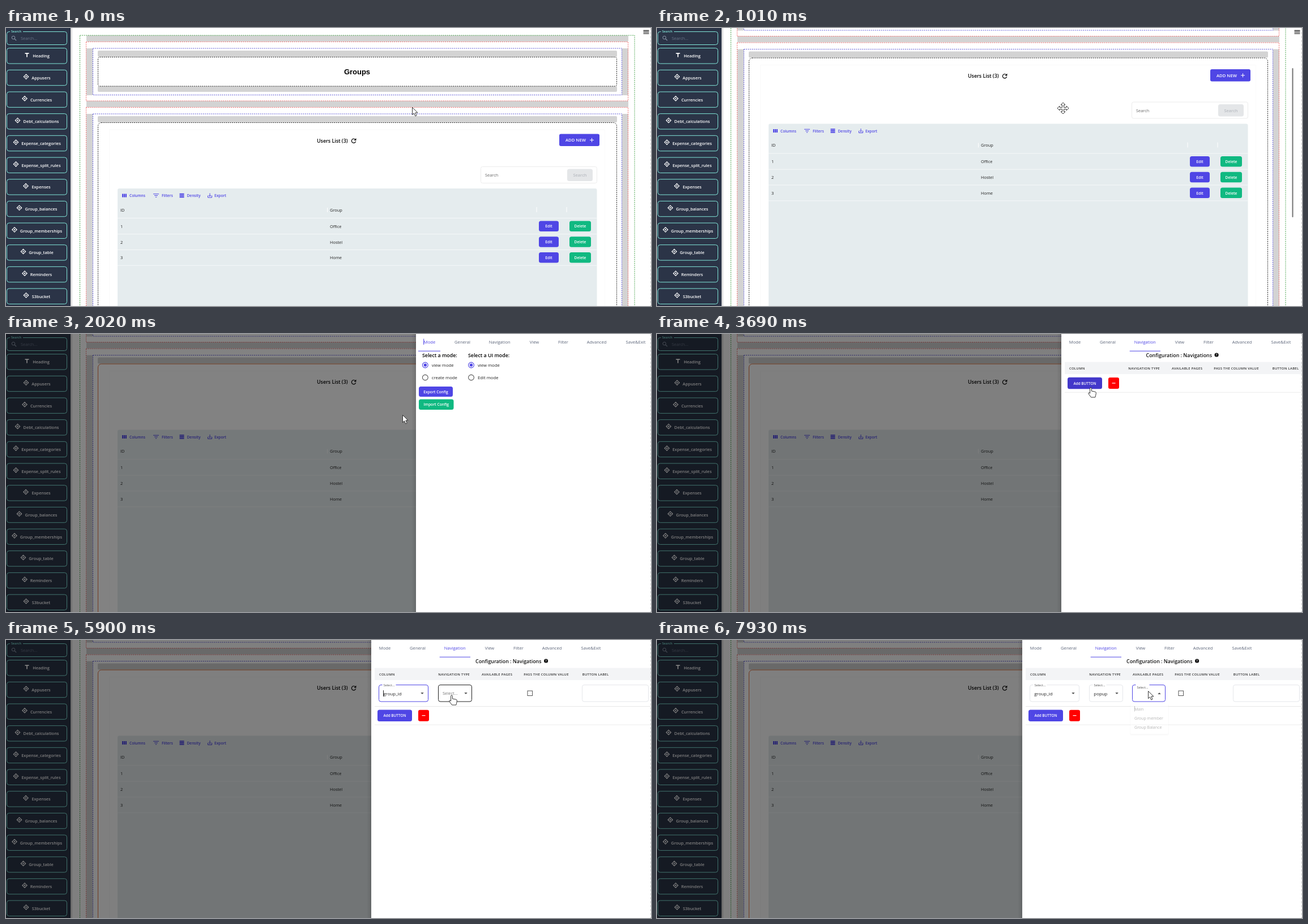
An HTML page that plays this animation: 1139 by 492 pixels, repeating every 8000 ms.

```html
<!DOCTYPE html>
<html lang="en">
<head>
<meta charset="utf-8">
<title>Page builder</title>
<style>
  html, body { margin: 0; width: 100%; height: 100%; overflow: hidden; background: #fff; }
  svg { display: block; width: 1139px; height: 492px; }
  text { font-family: "Open Sans", "Noto Sans", sans-serif; white-space: pre; }
</style>
</head>
<body>
<svg id="stage" viewBox="0 0 1139 492"></svg>
<script>
const LOOP = 8000, INDIGO = '#4f46e5', GREEN = '#10b981', GRAY = '#d3d3d3';

// Drawing helpers: boxes are given by their edges, text by its vertical centre.
const rect = (x1, y1, x2, y2, fill, extra = '') =>
  `<rect x="${x1}" y="${y1}" width="${x2 - x1}" height="${y2 - y1}" fill="${fill}" ${extra}/>`;
const frame = (x1, y1, x2, y2, color, extra = '') =>
  rect(x1, y1, x2, y2, 'none', `stroke="${color}" ${extra}`);
const path = (d, extra) => `<path d="${d}" ${extra}/>`;
const line = (d, color, width = 1) => path(d, `fill="none" stroke="${color}" stroke-width="${width}"`);
const at = (x, y, body, more = '') => `<g transform="translate(${x} ${y})${more}">${body}</g>`;
const text = (x, y, str, size, color = '#222', { bold = 0, mid = 0, extra = '' } = {}) =>
  `<text x="${x}" y="${y + size * 0.36}" font-size="${size}" fill="${color}" font-weight="${bold ? 600 : 400}"` +
  `${mid ? ' text-anchor="middle"' : ''} ${extra}>${str.replace('&', '&amp;')}</text>`;
const button = (x1, y1, x2, y2, fill, label, size = 6.7, color = '#fff') =>
  rect(x1, y1, x2, y2, fill, 'rx="3.5"') +
  text((x1 + x2) / 2, (y1 + y2) / 2 + 0.3, label, size, color, { bold: 1, mid: 1 });

const clamp = v => Math.min(1, Math.max(0, v));
const smooth = v => { v = clamp(v); return v * v * (3 - 2 * v); };
const between = (t, a, b) => t >= a && t < b;

// Sidebar
const chevron = 'M0-5 2.4-2.6 1.5-1.7 0-3.2-1.5-1.7-2.4-2.6Z';
const moveIcon = [0, 90, 180, 270].map(a => path(chevron, `fill="#fff" transform="rotate(${a})"`)).join('') +
  '<circle r="1.2" fill="#fff"/>';
const sideItems = [['Heading', 37], ['Appusers', 35.5], ['Currencies', 33], ['Debt_calculations', 20.5],
  ['Expense_categories', 17.5], ['Expense_split_rules', 17.5], ['Expenses', 35], ['Group_balances', 23.5],
  ['Group_memberships', 15], ['Group_table', 30.5], ['Reminders', 33], ['S3bucket', 35.5]];

function sidebar() {
  const teal = '#81e6d9';
  let out = rect(114, 0, 117, 492, '#dedede') + rect(0, 0, 114, 492, '#2b3447') +
    frame(1.5, 6.5, 107.5, 29.5, teal, 'rx="4"') + rect(7, 4, 30, 9, '#2b3447') +
    text(9, 6, 'Search', 5.6, teal, { bold: 1 }) +
    `<circle cx="13" cy="17" r="2.8" fill="none" stroke="#8a94a6"/>` + line('M15 19l3.2 3.2', '#8a94a6', 1.2) +
    text(26, 18.5, 'Search...', 7.4, '#6b7588');
  sideItems.forEach(([label, iconX], i) => {
    const y = 49.3 + i * 38.68;
    out += frame(1.5, y - 13.7, 107.5, y + 13.7, teal, 'rx="4"') +
      text(62, y + 0.4, label, 7.4, '#fff', { bold: 1, mid: 1 }) +
      at(iconX, y - 1.8, i ? moveIcon : line('M-3.5-2.7H3.5M0-2.7V4', '#fff', 1.7));
  });
  return out;
}

// Page behind the drawer
const dashed = 'stroke-dasharray="2 1.6"';

function section(top, bottom) {
  return rect(142, top + 12, 153, bottom - 10, GRAY) + rect(1088, top + 12, 1099, bottom - 10, GRAY) +
    rect(162, top + 16, 1079, top + 27, GRAY, 'rx="2"') +
    rect(162, bottom - 26, 1079, bottom - 16, GRAY, 'rx="2"') +
    frame(141.5, top + 0.5, 1098.5, bottom, '#f26d6d', dashed) +
    frame(153.5, top + 12, 1087.5, bottom - 10.5, '#5a55d6', dashed);
}

function table() {
  const icons = [
    at(209, 296.5, path('M-4-3h2.2v6h-2.2zM-1.1-3h2.2v6h-2.2zM1.8-3h2.2v6h-2.2z', `fill="${INDIGO}"`)),
    at(265, 296.5, line('M-5-2.7H5M-3 0H3M-1.2 2.7H1.2', INDIGO, 1.1)),
    at(310.5, 296.5, path('M-4-3.7h8v2h-8zM-4-1h8v2h-8zM-4 1.7h8v2h-8z', `fill="${INDIGO}"`)),
    at(360, 296.5, line('M-3.5 0v3.5h7v-3.5M0-4V1.5M-2-.5 0 1.5 2-.5', INDIGO))];
  const labels = [[218, 'Columns'], [275, 'Filters'], [319.5, 'Density'], [368, 'Export']];
  let out = rect(197, 284, 1043.5, 620, '#e5ecee', 'rx="3"') + icons.join('') +
    labels.map(([x, s]) => text(x, 296.7, s, 6.6, INDIGO, { bold: 1 })).join('') +
    text(202, 322.3, 'ID', 7.4) + text(572, 322.3, 'Group', 7.4) +
    line('M567.5 318v8M937 317v9M990 317v9', '#fff') + line('M197 336.5H1043.5', '#f6f8f9');
  ['Office', 'Hostel', 'Home'].forEach((name, i) => {
    const y = 350.7 + i * 27.8;
    out += text(202, y + 0.4, String(i + 1), 7.4) + text(572, y + 0.4, name, 7.4) +
      button(941, y - 9.3, 976, y + 9.3, INDIGO, 'Edit') +
      button(995, y - 9.3, 1033, y + 9.3, GREEN, 'Delete') +
      line(`M197 ${y + 14}H1043.5`, '#f6f8f9');
  });
  return out;
}

function page() {
  return rect(142, 13, 1099, 24, GRAY, 'rx="2"') + rect(142, 129, 1099, 140, GRAY) +
    section(24, 129) + section(140, 900) +
    frame(130.5, 13, 1110, 950, '#43a047', dashed) +
    frame(162.5, 51.5, 1078.5, 103, '#222', `rx="3" ${dashed}`) +
    text(620, 77, 'Groups', 13, '#000', { mid: 1, extra: 'style="font:700 13px \'Liberation Sans\',sans-serif"' }) +
    frame(182.5, 180, 1057, 700, '#fafafa') +
    text(549, 199.3, 'Users List (3)', 8.9, '#000', { bold: 1 }) +
    at(614, 199.7, line('M3-2.2A3.7 3.7 0 1 0 3.6 1', '#000', 1.2) + path('M4.4-4.6v4H.4z', '')) +
    rect(977, 187.5, 1048, 209, INDIGO, 'rx="3"') + text(988, 198.6, 'ADD NEW', 7.7, '#fff', { bold: 1 }) +
    line('M1031 198.3h7M1034.5 194.8v7', '#fff') +
    frame(838.5, 245.5, 1043.5, 274.5, '#ececec', 'rx="3"') + text(846, 260.5, 'Search', 7.4, '#666') +
    button(991, 249.5, 1036, 271, '#e4e6e8', 'Search', 7.4, '#b9bcc2') + table();
}

document.getElementById('stage').innerHTML =
  `<defs><clipPath id="view">${rect(117, 0, 1139, 492, '#000')}</clipPath>
  <linearGradient id="shade"><stop offset="0" stop-opacity="0"/><stop offset="1" stop-opacity=".12"/></linearGradient></defs>
  ${rect(0, 0, 1139, 492, '#fff')}
  <g clip-path="url(#view)"><g id="page">${page()}${frame(162.5, 167.5, 1078.5, 860, '#222', 'id="picked" rx="6"')}</g></g>
  ${line('M1125.5 4.5h10M1125.5 7.2h10M1125.5 9.9h10', '#222', 1.3)}
  ${rect(1121.5, 0, 1123.5, 264, '#757575', 'id="bar" rx="1"')}
  ${sidebar()}
  ${rect(0, 0, 1136, 492, '#000', 'id="dim"')}<g id="drawer"></g>
  ${path('M1138.5 0V492', 'stroke="#d5d5d5" stroke-dasharray="4 3"')}<g id="cursor"></g>`;

// Drawer
const tabs = [['Mode', 24], ['General', 82], ['Navigation', 147.7], ['View', 209],
  ['Filter', 260], ['Advanced', 319], ['Save&Exit', 388]];
const headings = [['COLUMN', 14], ['NAVIGATION TYPE', 118.3], ['AVAILABLE PAGES', 195],
  ['PASS THE COLUMN VALUE', 269.3], ['BUTTON LABEL', 372.7]];

function modePane() {
  const radio = (x, y, label, on) =>
    `<circle cx="${x}" cy="${y}" r="4.9" fill="none" stroke="${on ? INDIGO : '#555'}" stroke-width="1.1"/>` +
    (on ? `<circle cx="${x}" cy="${y}" r="2.7" fill="${INDIGO}"/>` : '') + text(x + 11.5, y + 0.5, label, 7.7);
  return text(735, 38, 'Select a mode:', 8.8, '#000', { bold: 1 }) +
    text(816, 38, 'Select a UI mode:', 8.8, '#000', { bold: 1 }) +
    radio(740.3, 55, 'view mode', 1) + radio(740.3, 77, 'create mode') +
    radio(821.5, 55, 'view mode', 1) + radio(821.5, 77, 'Edit mode') +
    button(729, 93, 789, 111, INDIGO, 'Export Config') + button(729, 115.5, 790.5, 134, GREEN, 'Import Config') +
    line('M737.7 8.5v10.5', INDIGO);
}

function select(x1, x2, { value, floating, focus, hover, open }) {
  const tip = open ? 1.5 : -1.5;
  return frame(x1, 79.5, x2, 109, focus ? INDIGO : hover ? '#222' : '#e5e7eb', 'rx="3.5"') +
    (floating ? rect(x1 + 6, 78, x1 + 30, 82, '#fff') + text(x1 + 8, open ? 84 : 79.8, 'Select...', 5.6, '#555') :
      text(x1 + 7.5, 94.5, 'Select...', 7.5, '#777')) +
    (value ? text(x1 + 7.8, 94.7, value, 7.9) : '') +
    path(`M${x2 - 13.2} ${94.5 + tip}h5.4l-2.7 ${-2 * tip}z`, 'fill="#555"');
}

function menu(t, opens, closes, x, width, items) {
  const shown = clamp((t - opens) / 200) * (1 - clamp((t - closes) / 150));
  if (!shown) return '';
  const bottom = 116 + items.length * 16;
  return `<g opacity="${shown}">` + rect(x - 1, 113, x + width + 1, bottom + 5, '#000', 'rx="3" opacity=".06"') +
    rect(x, 112, x + width, bottom + 2, '#fff', 'rx="2"') +
    items.map((s, i) => text(x + 7, 122.3 + i * 16, s, 7.05, '#333')).join('') +
    line(`M${x + 7.5} 117v9.5`, '#333', 0.8) + '</g>';
}

const T = { drawer: 1800, tab: 2850, add: 3850, column: 4600, columnSet: 5260,
  type: 6100, typeSet: 6790, pages: 7860 };

function ruleRow(t) {
  let out = select(658.5, 745.5, {
    value: t >= T.columnSet ? 'group_id' : '', floating: t >= T.column,
    focus: between(t, T.column, T.type), hover: between(t, 4400, T.column) }) +
    select(763.5, 822.5, {
      value: t >= T.typeSet ? 'popup' : '', floating: t >= T.type,
      focus: between(t, T.type, T.pages), hover: between(t, 5780, T.type) }) +
    frame(921, 90, 929.5, 98.5, '#555') + frame(1017.5, 79.5, 1134.5, 109, '#e5e7eb', 'rx="3.5"');
  if (t >= T.typeSet) out += select(839.5, 897.5, {
    value: t < T.pages ? '' : ' ', floating: t >= T.pages, focus: t >= T.pages, hover: t >= 7450, open: t >= T.pages });
  if (between(t, T.columnSet, T.type)) out += line('M666.5 89v11', '#222');
  return out + line('M651 117.5H1139', '#e8e8e8');
}

function navigationPane(t, x) {
  const added = t >= T.add, dy = added ? 46.7 : 0, middle = (x + 1139) / 2 - 4.7;
  const addColor = between(t, 3500, T.add) ? '#4338ca' : INDIGO;
  return text(middle, 38, 'Configuration : Navigations', 8.9, '#111', { bold: 1, mid: 1 }) +
    `<circle cx="${middle + 66.3}" cy="37" r="3.6" fill="#111"/>` +
    text(middle + 66.3, 37, '?', 5.6, '#fff', { bold: 1, mid: 1 }) +
    rect(x + 6, 49.5, 1139, 71, '#f3f4f6') +
    headings.map(([s, dx]) => text(x + dx, 60.5, s, 5.9, '#333', { bold: 1, extra: 'letter-spacing=".3"' })).join('') +
    (added ? ruleRow(t) : '') +
    button(x + 11, 76.7 + dy, x + 72, 97.2 + dy, addColor, 'Add BUTTON', 6.4) +
    rect(x + 83, 77 + dy, x + 102, 97 + dy, '#f00', 'rx="3"') + line(`M${x + 89.5} ${87 + dy}h6`, '#fff', 1.2) +
    line(`M${x + 6} ${103.3 + dy}H1139`, '#ececec') +
    menu(t, T.column, T.columnSet, 656, 90, ['group_id', 'group_name', 'description', 'created_by',
      'created_at', 'updated_at', 'currency', 'is_active']) +
    menu(t, T.type, T.typeSet, 758, 77, ['popup', 'page', 'drawer', 'new tab', 'back']) +
    menu(t, T.pages, LOOP, 836, 67, ['Main', 'Group member', 'Group Balance']);
}

function drawer(t) {
  if (t < T.drawer) return '';
  const x = t < T.tab ? 724 : t < T.add ? 714 : 645, active = t < T.tab ? 0 : 2;
  const [from, to] = active ? [120.7, 175] : [4, 43];
  return rect(x - 8, 0, x, 492, 'url(#shade)') + rect(x, 0, 1139, 492, '#fff') +
    tabs.map(([s, dx], i) => text(x + dx, 14.3, s, 7.6, i === active ? INDIGO : '#5b6478', { mid: 1 })).join('') +
    line(`M${x + from} 30.2H${x + to}`, INDIGO) + (active ? navigationPane(t, x) : modePane());
}

// Pointer
const shapes = {
  arrow: 'M.5.5V13.6L3.5 10.8 5.7 15.8 8 14.8 5.9 9.9H10Z',
  move: 'M0-10 4-6H1.5V-1.5H6V-4L10 0 6 4V1.5H1.5V6H4L0 10-4 6H-1.5V1.5H-6V4L-10 0-6-4V-1.5H-1.5V-6H-4Z',
  hand: 'M-1.4 1.4Q-1.4 0 0 0T1.4 1.4V6L7.6 7.2Q9.6 7.7 9.4 9.6L8.7 13.5 7.8 17H.5L-4 10.8Q-4.6 9-3 8.8L-1.4 10Z'
};
const route = [[0, 717, 140], [320, 717, 140], [400, 717, 142], [1080, 717, 142], [1200, 694, 136],
  [1880, 694, 136], [2020, 700, 143], [2540, 854, 18], [2680, 859, 21], [2900, 859, 21], [3620, 766, 95],
  [3900, 766, 95], [4490, 705, 92], [4650, 705, 92], [5090, 690, 122], [5270, 690, 122], [5900, 787, 98],
  [6120, 787, 98], [6570, 785, 122], [6800, 785, 122], [7520, 868, 88], [7930, 867, 90], [LOOP, 867, 90]];
const handTimes = [[2430, 2980], [3480, 4000], [4380, 4600], [4850, 5350], [5780, 6100], [6350, 6900], [7400, 7860]];

function cursor(t) {
  const i = route.findIndex(p => p[0] > t);
  const [t1, x1, y1] = route[i - 1], [t2, x2, y2] = route[i];
  const p = smooth((t - t1) / (t2 - t1));
  const kind = between(t, 400, 1800) ? 'move' : handTimes.some(([a, b]) => between(t, a, b)) ? 'hand' : 'arrow';
  return at(x1 + (x2 - x1) * p, y1 + (y2 - y1) * p,
    path(shapes[kind], 'fill="#fff" stroke="#222" stroke-width=".9" stroke-linejoin="round"'));
}

const [pageEl, picked, bar, dim, drawerEl, cursorEl] =
  ['page', 'picked', 'bar', 'dim', 'drawer', 'cursor'].map(id => document.getElementById(id));
let lastDrawer = '';

function render(t) {
  const scroll = smooth((t - 690) / 310);
  pageEl.setAttribute('transform', `translate(0 ${-114.5 * scroll})`);
  bar.setAttribute('y', 7 + 64 * scroll);
  bar.setAttribute('opacity', between(t, 730, T.drawer) ? 1 : 0);
  picked.setAttribute('stroke', t < 1950 ? '#222' : '#e0703f');
  picked.setAttribute('stroke-dasharray', t < T.drawer ? '2 1.6' : 'none');
  dim.setAttribute('opacity', 0.5 * smooth((t - 1820) / 220));
  const next = drawer(t);
  if (next !== lastDrawer) drawerEl.innerHTML = lastDrawer = next;
  cursorEl.innerHTML = cursor(t);
}

const start = performance.now();
function tick() {
  render((performance.now() - start) % LOOP);
  requestAnimationFrame(tick);
}
tick();
</script>
</body>
</html>
```
